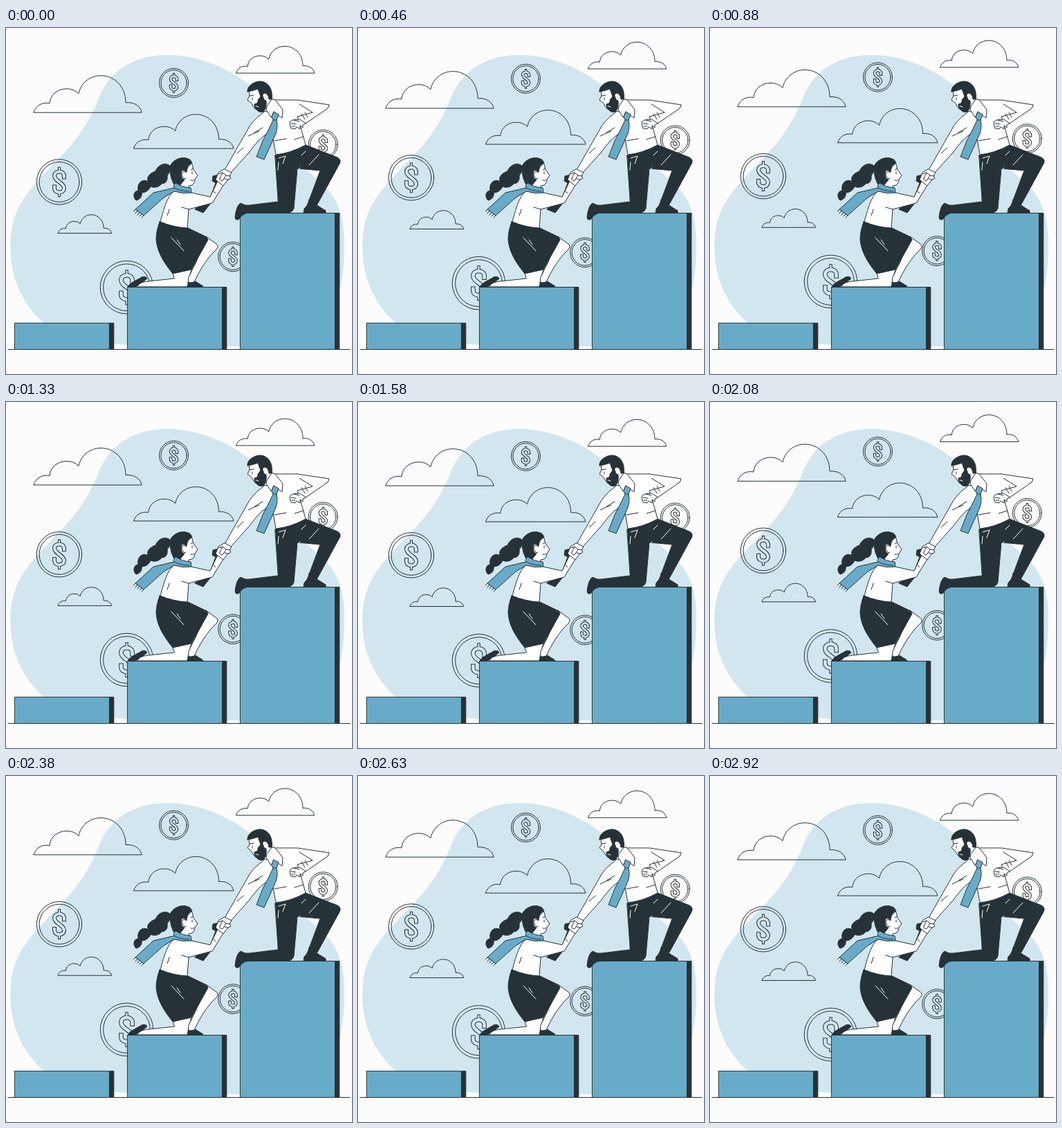
Animation of 500x500 px, one loop 2.96 s. Source, as an HTML page:

```html
<!DOCTYPE html>
<html lang="en">
<head>
<meta charset="utf-8">
<title>Helping hand</title>
<style>
html, body { margin: 0; width: 100%; height: 100%; overflow: hidden; background: #fcfcfc; }
svg { display: block; width: 100vw; height: 100vh; fill: none; stroke: #263238; stroke-linejoin: round; stroke-linecap: round; }
.blob { fill: #d2e6ef; stroke: none; }
.blue { fill: #68abc9; }
.dark { fill: #263238; }
.white { fill: #fff; }
.shine { stroke: #fff; }
path { vector-effect: non-scaling-stroke; }
</style>
</head>
<body>
<svg viewBox="0 0 500 500">
  <path class="blob" d="M230 39C180 40 149 66 136 97C125 124 114 147 88 176C69 198 34 228 18 260C1 294 5 340 15 368C27 402 52 430 80 441C130 458 200 461 270 461C350 461 430 458 462 425C484 400 490 345 489 305C488 270 478 244 458 226C437 207 421 196 408 168C395 137 382 106 350 81C318 56 274 38 230 39Z"/>

  <g id="floating"></g>
  <g id="blocks"></g>

  <g id="woman">
    <path class="dark" d="M273 262L285 267L303 244L311 222L307 212L299 214L298 221L303 224L295 245Z"/>
    <path class="white" d="M241 354L268 348L265 360L262 374H190C190 370 196 367 206 366L243 362Z"/>
    <path class="white" d="M290 302L304 312Q308 315 304 320L297 327Q283 343 272 367L263 369L264 360L274 340Z"/>
    <path class="dark" d="M176 374C179 368 190 364 196 360Q202 358 204 362L198 367C192 369 190 374 186 374Z"/>
    <path class="dark" d="M262 374L264 367Q269 370 274 366C278 370 284 371 285 374Z"/>
    <path class="dark" d="M222 280L263 289L290 302L292 306L268 349L241 355C228 339 218 323 217 305C217 297 219 288 222 280Z"/>
    <path class="shine" d="M239 303L257 322M247 306L252 313"/>
    <path class="white" d="M244 235C234 241 229 258 223 280Q242 288 262 289L264 262L298 253L314 227L306 221L295 244L268 238Z"/>
    <path d="M264 262L254 259M236 262L233 271M300 236L303 239"/>

    <path class="white" d="M247 216L246 230L263 237L264 228Q270 228 272 224L273 219L277 213L271 205L268 193L251 196Z"/>
    <path class="dark" d="M237 200C241 190 254 185 263 189Q268 190 268 196Q262 199 261 208Q253 202 253 211Q253 218 258 219Q254 226 246 231Q236 218 237 200Z"/>
    <path class="white" d="M261 209Q255 205 254 211Q255 218 260 218"/>
    <path d="M267 205L270 203M269 208V211M267 220Q270 222 272 219"/>
    <path class="dark" d="M238 200C231 193 220 197 216 207C207 210 202 217 206 222C197 217 189 224 191 235C184 235 183 245 188 249C193 248 197 244 196 238C202 238 207 234 209 229C216 232 222 229 225 225C231 225 234 220 233 213L238 206Z"/>
    <path class="blue" d="M246 224C242 225 242 228 243 231L213 238L187 262L199 271L228 245L243 236Q255 240 268 238L267 231Q254 230 246 224Z"/>
    <path d="M243 231Q252 236 265 236M187 262L184 265M190 264L187 268M193 266L190 270M196 269L193 272M199 271L196 274"/>
  </g>

  <g id="man">
    <path class="dark" d="M389 184L433 169L479 187Q486 191 481 198L452 251L438 249L454 206L421 203L416 260Q414 267 407 267H350Q341 269 337 276Q332 279 331 274Q332 262 336 256Q338 252 341 254Q345 257 352 256L393 251Z"/>
    <path class="dark" d="M438 248L452 251L449 256L462 264V267H430L431 261Q436 257 438 248Z"/>
    <path class="shine" d="M394 188L404 185L400 196M394 194L393 205M433 178L427 184M452 183L438 198M425 202L421 206"/>
    <path class="white" d="M385 104L421 104L467 111L465 116L433 138L424 137L433 169Q411 181 390 183L384 150Q371 152 351 180L325 209L316 205L348 149Q355 134 371 123Z"/>
    <path d="M424 137L421 128L443 122L424 110M432 132L427 124M436 129L432 122M371 144L359 151M366 149L350 156M334 181L343 173M388 163L405 160M417 161L430 157"/>
    <path class="white" d="M433 138L429 140V144L425 141V146L420 143L418 146L412 145L410 139Q409 135 414 133L424 132Z"/>
    <path d="M412 138L419 139M413 142H418M416 133L424 135"/>

    <path class="white" d="M351 91L352 98L349 104L354 108L360 117L376 121L385 115L384 97L372 82Z"/>
    <path class="dark" d="M349 92C348 84 358 77 368 77C379 78 386 88 384 103L380 103Q379 95 374 94Q369 95 372 101Q372 104 376 105Q377 116 372 121Q366 123 362 118Q358 114 359 110Q365 109 364 104L368 99L364 88Q357 91 349 92Z"/>
    <path d="M352 98L358 97M356 101V104"/>
    <path class="shine" d="M361 113L365 114"/>
    <path class="white" d="M384 103L377 113L376 118L383 129L387 122L399 130L400 118L389 104Z"/>
    <path class="blue" d="M387 121L394 125L391 133Q394 145 388 157L373 190L362 186L371 163Q378 150 386 133L384 129Z"/>
    <path d="M386 133H391"/>
  </g>

  <g id="hands">
    <path class="white" d="M316 204L326 209L323 214L325 217L320 220L314 228L306 222L303 219L307 209Z"/>
    <path d="M307 211L313 209L309 217M313 209L318 213L313 221M318 213L324 214M309 217Q308 221 312 221M316 218L321 219"/>
  </g>
</svg>
<script>
const LOOP = 2960, BOB = 1500, RISE = 10, STEP = 125 / 3;
const floating = document.getElementById('floating');

const cloud = (x, y, s) => `<path transform="translate(${x} ${y}) scale(${s})"
  d="M0 0C3 -9 11 -15 23 -13C24 -26 35 -34 48 -34Q58 -34 65 -27C68 -42 81 -53 97 -53C117 -53 133 -37 133 -14C144 -15 154 -10 156 0Z"/>`;

const DOLLAR = 'M7 -7V-9C7 -17 -7 -17 -7 -9C-7 -1 7 1 7 9C7 17 -7 17 -7 9V7';
const BARS = 'M0 -16V-20M0 16V20';

function coin(x, y, r, fill = '#d2e6ef') {
  const s = r / 33;
  const line = (d, width, color) => `<path d="${d}" transform="scale(${s})"
    stroke="${color}" stroke-width="${width}" stroke-linecap="square"/>`;
  const sign = (grow, color) =>
    line(BARS, 2 * s + grow, color) + line(DOLLAR, 4 * s + grow, color);
  return `<g transform="translate(${x} ${y})"><circle r="${r}"/><circle r="${r * .885}"/>
    ${sign(2, '#263238')}${sign(0, fill)}</g>`;
}

floating.innerHTML =
  cloud(40, 121.8, 1) + cloud(184.5, 173.8, .925) + cloud(332.5, 64.8, .725) + cloud(75, 296.2, .497) +
  coin(242.5, 79.4, 21) + coin(77, 222.5, 32.7) + coin(174.5, 374.8, 38.3) +
  coin(458.3, 168.2, 21, '#fcfcfc') + coin(328, 330.5, 21.3);

const block = (x, y) => `<path class="blue" d="M${x} ${y}h137V464.5h-137Z"/>
  <path class="dark" d="M${x + 137} ${y}h6V464.5h-6Z"/>`;
document.getElementById('blocks').innerHTML =
  block(12.8, 426.4) + block(175.8, 374.5) + block(338.8, 267.5) + '<path d="M3 464.5H497"/>';

// Linear up-and-down drift, advanced at 24 steps per second
function draw(now) {
  const t = Math.floor((now % LOOP + 5) / STEP) * STEP % BOB;
  const lift = RISE * (1 - Math.abs(1 - 2 * t / BOB));
  floating.setAttribute('transform', `translate(0 ${-lift})`);
  requestAnimationFrame(draw);
}
requestAnimationFrame(draw);
</script>
</body>
</html>
```
